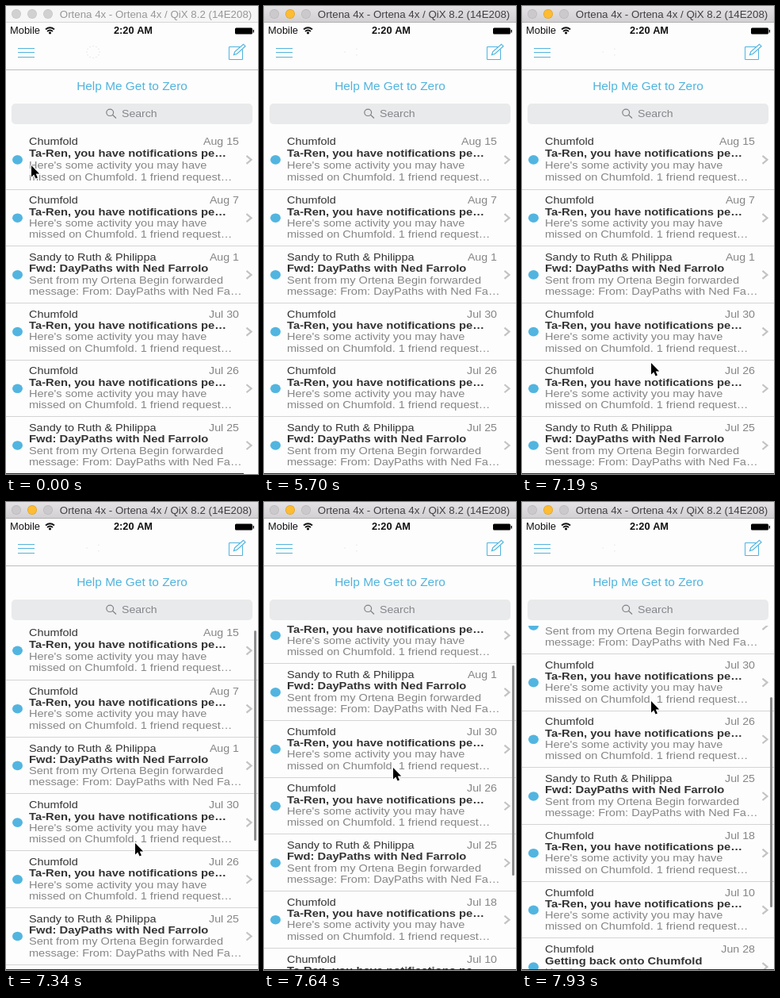
An HTML page with a canvas for the animation above (8 s loop, 318x590 px).

```html
<!DOCTYPE html>
<html lang="en">
<head>
<meta charset="utf-8">
<title>Inbox</title>
<style>
html, body { margin: 0; height: 100%; overflow: hidden; background: #fdfdfd; }
canvas { display: block; }
</style>
</head>
<body>
<canvas id="stage" width="318" height="590"></canvas>
<script>
const ctx = document.getElementById('stage').getContext('2d');
const LOOP = 8000, ACTIVE_AT = 5700, SCROLL_AT = 7340;
const ROW = 71.7, LEAD = 14.3, STRETCH = 1.11;
const BLUE = '#50b4de', GREY = '#868686';

// time, x, y of the pointer tip; no position means hidden
const pointerSteps = [
  [0, 32, 201], [450, 33, 289], [600, 52.5, 518], [750, 52.5, 535], [1050],
  [5700], [6150, 147, 470], [6290, 163, 451], [7190, 163, 450],
  [7340, 163, 430], [7490, 163, 381], [7640, 163, 335],
  [7790, 163, 292], [7930, 163, 251]
];

const social = date => ({
  date, from: 'Chumfold', subject: 'Ta-Ren, you have notifications pe…',
  lines: ["Here's some activity you may have", 'missed on Chumfold. 1 friend request…']
});
const forward = date => ({
  date, from: 'Sandy to Ruth & Philippa', subject: 'Fwd: DayPaths with Ned Farrolo',
  lines: ['Sent from my Ortena Begin forwarded', 'message: From: DayPaths with Ned Fa…']
});
const mails = [
  social('Aug 15'), social('Aug 7'), forward('Aug 1'), social('Jul 30'), social('Jul 26'),
  forward('Jul 25'), social('Jul 18'), social('Jul 10'),
  { ...social('Jun 28'), subject: 'Getting back onto Chumfold' }
];

function text(str, x, y, size, color, { bold = false, align = 'left', stretch = STRETCH } = {}) {
  ctx.save();
  ctx.translate(x, Math.round(y));
  ctx.scale(stretch, 1);
  ctx.font = `${bold ? 'bold ' : ''}${size}px "Liberation Sans", Arial, sans-serif`;
  ctx.textAlign = align;
  ctx.fillStyle = color;
  ctx.fillText(str, 0, 0);
  ctx.restore();
}

function rect(x, y, w, h, color, r = 0) {
  ctx.fillStyle = color;
  ctx.beginPath();
  ctx.roundRect(x, y, w, h, r);
  ctx.fill();
}

function dot(x, y, rx, ry, color) {
  ctx.fillStyle = color;
  ctx.beginPath();
  ctx.ellipse(x, y, rx, ry, 0, 0, 7);
  ctx.fill();
}

function line(d, color, width = 1) {
  ctx.strokeStyle = color;
  ctx.lineWidth = width;
  ctx.stroke(new Path2D(d));
}

function titleBar(active) {
  const bg = ctx.createLinearGradient(0, 0, 0, 20);
  bg.addColorStop(0, active ? '#e4e2e4' : '#f6f6f6');
  bg.addColorStop(1, active ? '#d2d0d2' : '#f6f6f6');
  rect(0, 0, 318, 20, bg);
  rect(0, 20, 318, 1, active ? '#b2b0b2' : '#d6d6d6');
  [13, 33, 53].forEach((x, i) => {
    const lit = active && i === 1;
    dot(x, 10, 6, 6, lit ? '#dfa126' : active ? '#b9b7b9' : '#c6c6c6');
    dot(x, 10, 5.3, 5.3, lit ? '#fdbc33' : active ? '#cbc9cb' : '#d1d1d1');
  });
  text('Ortena 4x - Ortena 4x / QiX 8.2 (14E208)', 189, 15, 13.3,
    active ? '#423f45' : '#979797', { align: 'center', stretch: 1 });
}

function statusBar() {
  text('Mobile', 5, 35, 12.4, '#111', { stretch: 1.04 });
  text('2:20 AM', 160.5, 35, 12.3, '#111', { bold: true, align: 'center', stretch: 1.04 });
  line('M50 29.5Q55.5 25 61 29.5M52 32Q55.5 29 59 32', '#111', 1.7);
  dot(55.5, 34, 1.6, 1.4, '#111');
  rect(289, 27.5, 22, 8, '#000', 1.5);
  rect(311.7, 30, 1.3, 3.5, '#000');
}

function navBar(active) {
  for (const y of [53, 58, 64]) rect(15, y, 21, 1, BLUE);
  line('M295 51.5H281.5V67.5H298.5V55', BLUE);
  line('M287.5 61.5L288.8 57.5L299.5 48.2L302 50.7L291.5 60.3Z', BLUE, 1.2);
  for (let i = 0; i < 12; i++) {
    if (active && i % 5 !== 1) continue;
    const a = i * Math.PI / 6;
    dot(110 + 8 * Math.cos(a), 58 + 7.5 * Math.sin(a), 0.8, 0.8, '#e6e6e6');
  }
  rect(0, 80, 318, 1, '#bdbdbd');
  text('Help Me Get to Zero', 159, 106, 13.9, BLUE, { align: 'center' });
  rect(7, 123, 304, 26, '#e9eaec', 5);
  line('M135.6 134.3a4.4 4.2 0 1 1 -8.8 0a4.4 4.2 0 1 1 8.8 0M134.5 137.3L139 141.5', '#7f8083', 1.2);
  text('Search', 146, 140, 12.7, '#85868a');
}

function mailRow(mail, i, scroll) {
  const first = i === 0;
  const lead = first ? 14.85 : LEAD;
  const y = 249.3 + ROW * (i - 1) - (first ? 2.3 : 0) - scroll;
  const mid = y + lead * 1.25;
  if (!first) rect(0, Math.floor(y - 18.3), 318, 1, '#d4d4d4');
  text(mail.from, 29, y, 13, '#333');
  text(mail.date, 294, y, 12.8, GREY, { align: 'right' });
  text(mail.subject, 29, y + lead, 13.3, '#333', { bold: true });
  mail.lines.forEach((s, n) => text(s, 29, y + lead * (n + 2), 13.12, GREY));
  dot(14.5, mid, 6.5, 5.8, '#52b5e0');
  line(`M303.5 ${mid - 5}L309.5 ${mid}L303.5 ${mid + 5}`, '#c3c3c3', 2.2);
}

function mailList(scroll, active, scrolling) {
  ctx.save();
  ctx.beginPath();
  ctx.rect(0, 156, 318, 433);
  ctx.clip();
  mails.forEach((mail, i) => mailRow(mail, i, scroll));
  if (scrolling) rect(313, 159 + scroll * 0.475, 3, 265, '#8c8c8c', 1.5);
  ctx.restore();
  rect(0, 589, active ? 318 : 300, 1, '#2e2e2e');
}

function pointer(x, y) {
  const arrow = new Path2D('M0 0V14.4L3.3 11.4L5.6 16.6L7.9 15.6L5.7 10.5H10.2Z');
  ctx.save();
  ctx.translate(x, y);
  ctx.lineJoin = 'round';
  ctx.strokeStyle = '#fff';
  ctx.lineWidth = 2;
  ctx.stroke(arrow);
  ctx.fillStyle = '#000';
  ctx.fill(arrow);
  ctx.restore();
}

function draw(now) {
  const t = now % LOOP;
  const active = t >= ACTIVE_AT, scrolling = t >= SCROLL_AT;
  const [, x, y] = pointerSteps.findLast(step => step[0] <= t);
  // the list follows the drag once it has passed a short threshold
  const scroll = scrolling ? Math.max(6.5, 434 - y) : 0;
  rect(0, 0, 318, 590, '#fdfdfd');
  titleBar(active);
  statusBar();
  navBar(active);
  mailList(scroll, active, scrolling);
  if (x !== undefined) pointer(x, y);
}

const start = performance.now();
function tick() {
  draw(performance.now() - start);
  requestAnimationFrame(tick);
}
tick();
</script>
</body>
</html>
```
